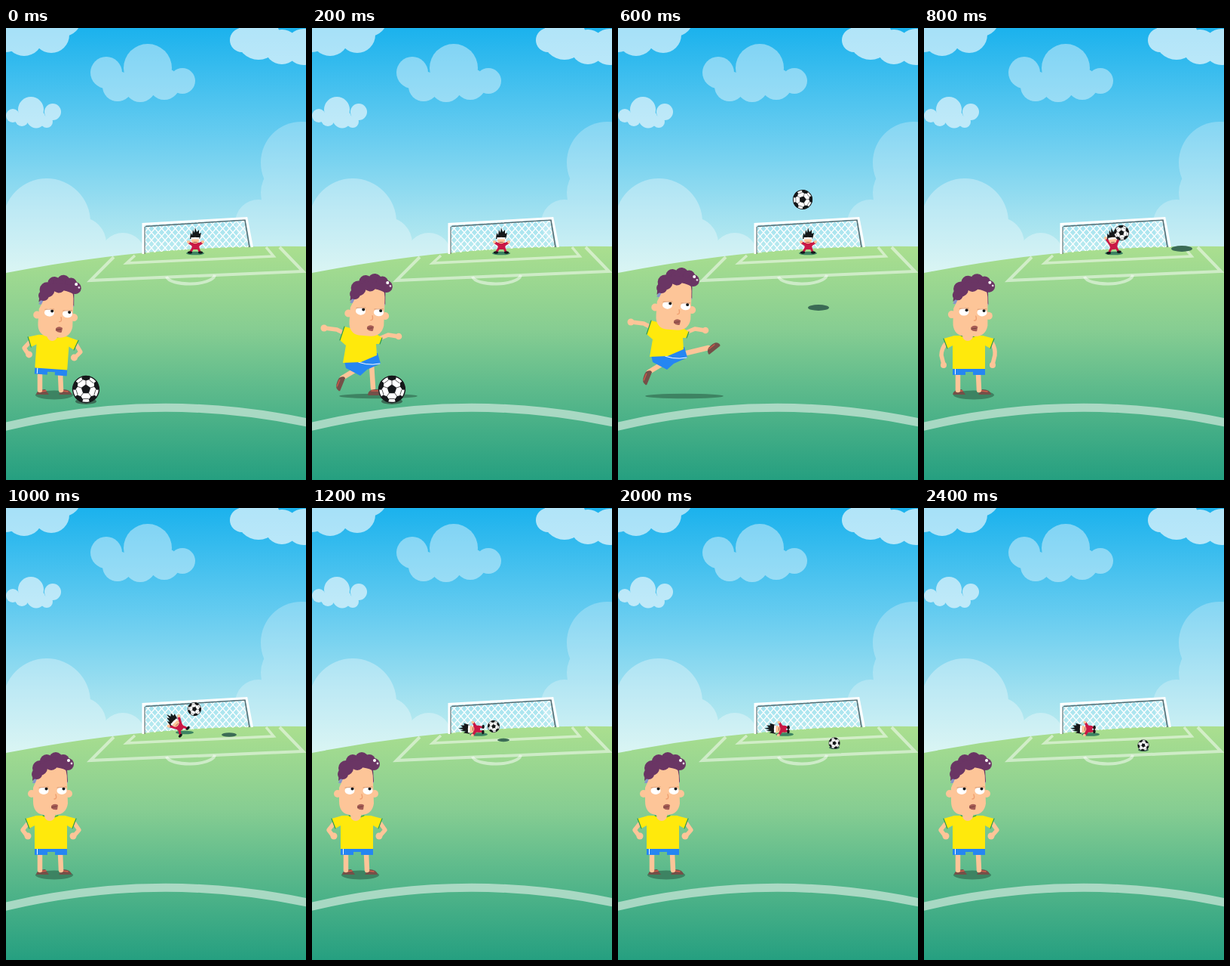
An HTML page for the animation above (3600 ms loop, 398 by 598 pixels).

```html
<!DOCTYPE html>
<html lang="en">
<head>
<meta charset="utf-8">
<title>Penalty kick</title>
<style>
  html, body { margin: 0; width: 100%; height: 100%; overflow: hidden; }
  svg { display: block; width: 398px; height: 598px; }
</style>
</head>
<body>
<svg id="stage" viewBox="0 0 398 598" xmlns="http://www.w3.org/2000/svg">
  <defs>
    <linearGradient id="sky" gradientUnits="userSpaceOnUse" x1="0" y1="0" x2="0" y2="325">
      <stop offset="0" stop-color="#1bb2ed"/>
      <stop offset=".45" stop-color="#69cdf0"/>
      <stop offset=".75" stop-color="#9fe0f0"/>
      <stop offset="1" stop-color="#c9f1ee"/>
    </linearGradient>
    <linearGradient id="grass" gradientUnits="userSpaceOnUse" x1="0" y1="288" x2="0" y2="598">
      <stop offset="0" stop-color="#abdf8f"/>
      <stop offset=".36" stop-color="#86cd92"/>
      <stop offset=".6" stop-color="#5fbb8c"/>
      <stop offset="1" stop-color="#259f80"/>
    </linearGradient>
    <clipPath id="netArea"><path d="M184 261L316 253L323 290Q250 291 184 298Z"/></clipPath>
    <clipPath id="ballEdge"><circle r="18"/></clipPath>
  </defs>
  <rect width="398" height="598" fill="url(#sky)"/>
  <g id="clouds" fill="#fff"></g>
  <path d="M0 324Q200 285 398 289V598H0Z" fill="url(#grass)"/>
  <g fill="none" stroke="#fff" stroke-opacity=".5">
    <path d="M143 303L112 334L394 322L363 290" stroke-width="4"/>
    <path d="M171 301L160 311L355 302L345 290" stroke-width="3.5"/>
    <path d="M213 329C217 342 273 342 277 327" stroke-width="4"/>
    <path d="M-4 528Q200 479.500 402 522.500" stroke="#c7e6d7" stroke-opacity=".75" stroke-width="11"/>
  </g>
  <g id="net" clip-path="url(#netArea)" stroke="#fff" stroke-width="1.300"></g>
  <g fill="none">
    <path d="M185 262.500L317 254L323 290" stroke="#596e73" stroke-width="1.600"/>
    <path d="M182 299V259.500L319 251.500L326.500 290" stroke="#fff" stroke-width="3"/>
    <path d="M184 299V263" stroke="#666" stroke-width="1"/>
  </g>
  <g id="actors"></g>
</svg>
<script>
const $ = id => document.getElementById(id);
const oval = (x, y, rx, ry, fill) => `<ellipse cx="${x}" cy="${y}" rx="${rx}" ry="${ry}" fill="${fill}"/>`;
const dot = (x, y, r, fill) => oval(x, y, r, r, fill);
const area = (d, fill) => `<path d="${d}" fill="${fill}"/>`;
const line = (d, color, w) =>
  `<path d="${d}" fill="none" stroke="${color}" stroke-width="${w}" stroke-linecap="round" stroke-linejoin="round"/>`;
const put = (move, art) => `<g transform="${move}">${art}</g>`;

const SKIN = '#fdc598', HAIR = '#6a3564', YELLOW = '#ffe90c', GREEN = '#2f9b50',
      BLUE = '#2586f2', SHOE = '#755048', SHADE = '#3d8362', RED = '#c91845', INK = '#15181a';

const clouds = [
  [.61, [[0, 9, 23], [24, 12, 25], [60, 9, 24], [76, -13, 24]]],
  [.42, [[133, 59, 21], [148, 77, 20], [188, 53, 32], [178, 77, 21], [210, 74, 21], [234, 70, 17]]],
  [.6, [[9, 116, 9], [33, 108, 17], [21, 121, 9], [40, 120, 12.5], [62, 111, 11], [54, 124, 8]]],
  [.66, [[313, 16, 16], [335, 13, 29], [366, 25, 23], [395, 25, 24]]],
  [.25, [[392, 178, 54], [380, 218, 42], [335, 258, 31], [385, 280, 55]]],
  [.33, [[54, 257, 58], [98, 285, 35], [155, 301, 30], [5, 310, 50]]]
];
$('clouds').innerHTML = clouds.map(([alpha, puffs]) =>
  `<g opacity="${alpha}">${puffs.map(p => dot(...p, '#fff')).join('')}</g>`).join('');

let mesh = '';
for (let x = 130; x < 380; x += 9)
  mesh += `<path d="M${x} 250l44 50M${x} 250l-44 50"/>`;
$('net').innerHTML = mesh;

// Five-fold pattern: a middle patch, seams and patches at the rim.
function ball(x, y, r, turn) {
  const at = (rad, deg) => {
    const a = deg * Math.PI / 180;
    return (rad * Math.cos(a)).toFixed(1) + ' ' + (rad * Math.sin(a)).toFixed(1);
  };
  const fives = [0, 72, 144, 216, 288];
  let art = dot(0, 0, 18, '#fff');
  art += area('M' + fives.map(a => at(6.6, a)).join('L') + 'Z', INK);
  for (const a of fives) {
    art += line(`M${at(6, a)}L${at(12, a)}M${at(13, a + 21)}L${at(13, a + 51)}`, '#555', .9);
    art += area(`M${at(11.5, a)}L${at(14, a + 21)}L${at(19, a + 19)}L${at(19, a - 19)}L${at(14, a - 21)}Z`, INK);
  }
  return put(`translate(${x} ${y}) rotate(${turn}) scale(${r / 18})`,
    `<g clip-path="url(#ballEdge)">${art}</g><circle r="17.4" fill="none" stroke="${INK}" stroke-width="1.400"/>`);
}

const head =
  dot(34, 378, 5, SKIN) + dot(83, 378, 5, SKIN) +
  area('M35 364L42 344H80L82 364Z', '#8794c9') +
  area('M77 346H81L82 363L79 360Z', HAIR) +
  area('M44 352Q46 341 60 341H76Q81 346 81 360L82 391Q80 405 66 406H50Q36 404 36 388V370Z', SKIN) +
  [[41, 352, 7], [45, 344, 10], [54, 335, 9], [66, 332, 9], [76, 334, 8], [82, 339, 8], [60, 338, 9]]
    .map(p => dot(...p, HAIR)).join('') +
  area('M35 361Q35 341 56 334L80 336L80 347Q60 338 46 351Z', HAIR) +
  dot(83, 334, 2, '#fff') + dot(87, 338, 1.4, '#e9d9e8') +
  oval(50, 374, 6.5, 5, '#fff') + oval(74, 374, 6.5, 5, '#fff') +
  dot(53.500, 371.500, 2, INK) + dot(76.500, 371.500, 2, INK) +
  line('M44 370L56 369M68 370L80 369', '#d99a72', 1) +
  line('M66 379Q68 385 64 385', '#ee9f70', 1.4) +
  area('M60 394Q64 390 69 393L68 399Q63 400 60 397Z', '#a65d55') +
  line('M61 396L67 395', '#74403e', 1);

const arms = {
  hips: ['M30 416L22 426L28 434', 'M90 416L97 426L90 434'],
  down: ['M30 416Q23 424 23 433L26 445', 'M90 416Q95 424 94 433L91 445']
};
function torso(kind) {
  const [left, right] = arms[kind];
  const ends = kind === 'hips' ? dot(29, 434, 4.5, SKIN) + dot(89, 434, 4.5, SKIN)
                               : dot(26, 446, 4, SKIN) + dot(91, 446, 4, SKIN);
  return line(left, SKIN, 5.5) + line(right, SKIN, 5.5) + ends +
    area('M38 449H81V459H65V455H55V459H38Z', BLUE) + line('M41.500 451V458', '#fff', 1) +
    area('M40 407H78L93 411L88 424L81 420V451H38V420L31 424L26 411Z', YELLOW) +
    line('M26 411L31 424M93 411L88 424M49 407Q59 412 69 407', GREEN, 1.2);
}
const shoe = (x, dir) =>
  area(`M${x - 9 * dir} 485Q${x - 8 * dir} 478 ${x + 3 * dir} 478L${x + 8 * dir} 485Z`, SHOE) +
  line(`M${x - 4 * dir} 481L${x + 4 * dir} 480`, '#d65d4c', 1.5);
const legs = wide =>
  oval(64 + wide, 485.500, 25 + wide, 6, SHADE) + shoe(49 - wide, 1) + shoe(78 + wide, -1) +
  line('M45 457V479M72 457L73 479', SKIN, 6.5);

function stand(kind, headMove, lean = 0, wide = 0) {
  return legs(wide) +
    put(`rotate(${lean} 60 455)`, torso(kind) + line('M58 403V407', SKIN, 14) + put(headMove, head));
}

const boot = (x, y, turn) =>
  put(`translate(${x} ${y}) rotate(${turn})`, area('M-10 3Q-9 -4 0 -4Q9 -5 10 2L9 4H-9Z', SHOE) +
    line('M-5 -2L4 -2', '#c85b4a', 1.5));
const kickTop =
  line('M60 384L50 379L34 377', SKIN, 5.5) + dot(33, 377, 4.5, SKIN) +
  line('M106 391L118 386L131 388', SKIN, 5.5) + dot(132, 388, 4.3, SKIN) +
  area('M60 421L104 410L108 424L90 432L81 440L62 430Z', BLUE) +
  line('M72 419Q88 428 107 424', '#fff', 1) +
  area('M60 375L104 386L110 390L107 398L102 398L103 413L82 422L58 423L62 400L54 393Z', YELLOW) +
  line('M60 375L54 393M110 390L107 398', GREEN, 1.2) +
  put('translate(31.500 -18.500) rotate(4 62 374)', head);
const backLeg = line('M72 434L57 443', SKIN, 6.5) + boot(54, 450, -68);
const kick = backLeg + line('M107 418L136 411', SKIN, 6.5) + boot(142, 411, -38) + kickTop;
const windUp = backLeg + line('M96 425L98 456', SKIN, 6.5) + boot(101, 462, 0) + kickTop;

const idle = stand('hips', '');
const tense = stand('hips', 'translate(2 3)', 4);
const settled = stand('down', 'translate(3 2) rotate(2 62 374)', 0, 2);

function keeper(x, y, turn, pose = 'wide') {
  const lying = pose === 'flat' || pose === 'curled';
  const hand = pose === 'up' ? -20 : -14;
  const gap = pose === 'curled' ? 2 : lying ? 3 : 6;
  const feet = pose === 'curled' ? -1 : 0;
  const art =
    line(`M-3 -7L${-gap} -2M4 -7L${gap} -2`, RED, 3) +
    oval(-gap - 1, feet - 1, 3, 1.7, INK) + oval(gap + 1, feet - 1, 3, 1.7, INK) +
    line(`M-3 -11L-8 ${hand}M4 -11L9 ${hand}`, RED, 3.4) +
    dot(-9, hand - 1, 2, SKIN) + dot(10, hand - 1, 2, SKIN) +
    area('M-5 -14H6L5 -5H-4Z', RED) +
    area('M-7 -19L-6 -27L-4 -24L-3 -31L-1 -27L0 -34L2 -28L5 -31L5 -26L8 -27L6 -19Z', INK) +
    oval(0, -17, 5, 4.3, SKIN) + area('M-5.500 -21H5.500V-18.500H-5.500Z', '#fff') +
    line('M-2 -14.500H2', '#923b39', .8);
  const shade = lying ? oval(x - 7, y + 6.5, 12, 2.3, SHADE) : oval(x, y, 12, 2.3, SHADE);
  return shade + put(`translate(${x} ${y}) rotate(${turn})`, lying ? put('scale(.9 1)', art) : art);
}

const airShade = (x, y) => oval(x, y, 52, 3.2, SHADE);
const ready = keeper(251, 298, 0);
const alert = keeper(252, 298, 0);
const down = keeper(228, 293, -88, 'curled');

// Per step: ball x, y, radius, turn; its shadow x, y, half width; player; keeper.
const steps = [
  [106, 478, 18, -18, 106, 494, 14, tense, ready],
  [106, 478, 18, -18, 106, 494, 14, airShade(88, 487) + put('translate(-17 20)', windUp), ready],
  [216, 427, 16, 20, 189, 466, 14, airShade(101, 487) + kick, alert],
  [245, 227, 13, 70, 266, 370, 14, airShade(88, 487) + put('translate(-16 12)', kick), alert],
  [262, 271, 10, 120, 342, 292, 14, settled, keeper(252, 298, -6, 'up')],
  [250, 266, 9, 150, 296, 300, 10, idle, keeper(237, 297, -45, 'up')],
  [241, 289, 8, 190, 254, 307, 8, idle, keeper(228, 293, -88, 'flat')],
  [259, 296, 8, 240, 264, 309, 8, idle, down],
  [275, 302, 8, 290, 274, 311, 7, idle, down],
  [282, 307, 7.7, 330, 281, 315, 7, idle, down],
  [287, 311, 7.5, 360, 287, 317, 7, idle, down],
  [290, 313, 7.5, 375, 290, 319, 7, idle, down],
  [291, 314, 7.5, 385, 291, 320, 7, idle, down]
];
const scenes = steps.map(([x, y, r, turn, sx, sy, sw, player, goalie]) =>
  goalie + player + oval(sx, sy, sw, sw * .28, '#3b6b55') + ball(x, y, r, turn));

const STEP = 200, LOOP = 3600, start = performance.now();
let shown = -1;
function draw(now) {
  const t = Math.max(0, now - start) % LOOP;
  const i = Math.min(Math.floor(t / STEP), scenes.length - 1);
  if (i !== shown) $('actors').innerHTML = scenes[shown = i];
  requestAnimationFrame(draw);
}
draw(start);
</script>
</body>
</html>
```
